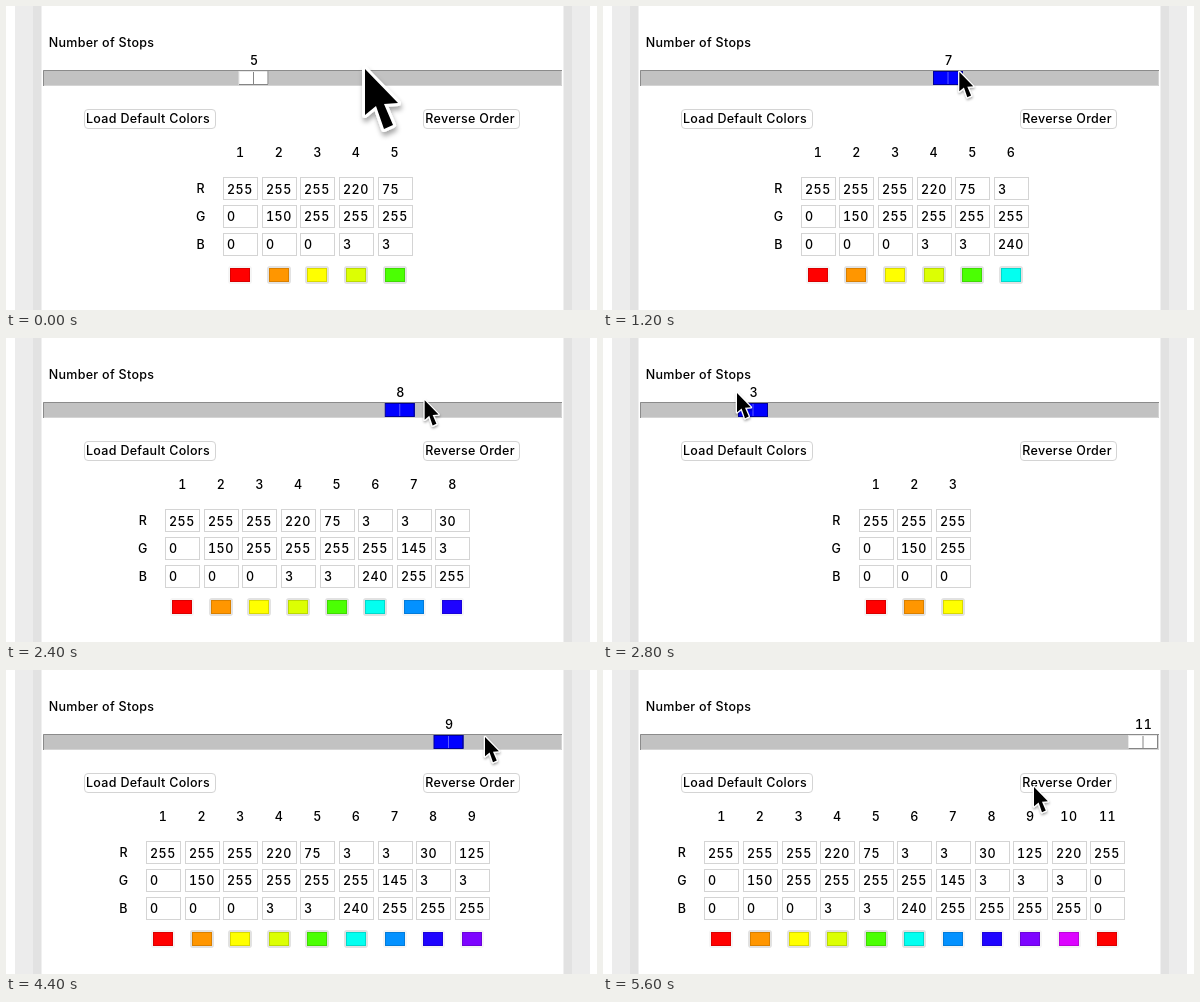
An HTML page that plays this animation: 591 by 304 pixels, repeating every 5800 ms.

```html
<!DOCTYPE html>
<html lang="en">
<head>
<meta charset="utf-8">
<title>Color stops</title>
<style>
  html, body { margin: 0; width: 100%; height: 100%; overflow: hidden; background: #fff; }
  svg { display: block; }
  text { font: 500 12.5px Inter, "Open Sans", sans-serif; letter-spacing: .3px; fill: #000; }
  .num { letter-spacing: .6px; font-variant-numeric: tabular-nums; }
  .mid { text-anchor: middle; }
  .button { fill: #fff; stroke: #d4d4d4; }
  .entry { fill: #fff; stroke: #d4d4d4; }
</style>
</head>
<body>
<svg width="591" height="304" viewBox="0 0 591 304">
  <defs>
    <filter id="shadow" x="-50%" y="-30%" width="200%" height="180%">
      <feDropShadow dx="1" dy="4" stdDeviation="2.5" flood-opacity=".35"/>
    </filter>
    <clipPath id="leftover"><rect x="234" y="165" width="20" height="90"/></clipPath>
  </defs>
  <rect width="591" height="304" fill="#fff"/>
  <path d="M9 0H27V304H9ZM566 0H584V304H566Z" fill="#ececec"/>
  <path d="M27 0H35.5V304H27ZM557.5 0H566V304H557.5Z" fill="#e2e2e2"/>
  <text x="42.7" y="41">Number of Stops</text>
  <rect x="37" y="64" width="519" height="16" fill="#c2c2c2"/>
  <path d="M37.5 80V64.5H556" fill="none" stroke="#8b8b8b"/>
  <path d="M38 79.5H555.5V65" fill="none" stroke="#d4d4d4"/>
  <rect class="button" x="78.5" y="103.5" width="131" height="19" rx="3.5"/>
  <text x="80" y="117">Load Default Colors</text>
  <rect class="button" x="417.5" y="103.5" width="96" height="19" rx="3.5"/>
  <text x="419.3" y="117">Reverse Order</text>
  <g id="slider"></g>
  <g id="table"></g>
  <path id="cursor" d="M0 0V46L11 37L19 60L28 56L19 35L33 34Z" stroke="#fff" stroke-width="6"
        stroke-linejoin="round" paint-order="stroke" filter="url(#shadow)"/>
</svg>
<script>
const STEP = 200, STEPS = 29, PITCH = 38.6;
const COLORS = [
  [255, 0, 0], [255, 150, 0], [255, 255, 0], [220, 255, 3], [75, 255, 3], [3, 255, 240],
  [3, 145, 255], [30, 3, 255], [125, 3, 255], [220, 3, 255], [255, 0, 0]
];
// tracks: step, then values interpolated between the key points
const SLIDER = [[0, 5], [4, 5], [10, 11], [11, 11], [14, 3], [15, 2], [24, 11], [28, 11]];
const CURSOR = [
  [0, 359, 63], [1, 412, 63], [4, 257, 66], [10, 555, 66], [11, 561, 66],
  [14, 134, 55], [15, 92, 57], [18, 259, 60], [22, 479, 67], [25, 553, 67], [28, 431, 117]
];
const LAGGING = [6, 18], UNFILLED = 18;   // steps where the table is still being rebuilt

const el = id => document.getElementById(id);
const text = (x, y, s, cls) => `<text class="${cls}" x="${x}" y="${y}">${s}</text>`;
const rowY = row => 187 + row * 27.8;

function sample(track, step) {
  const i = Math.max(1, track.findIndex(k => k[0] >= step));
  const a = track[i - 1], b = track[i];
  const p = (step - a[0]) / (b[0] - a[0]);
  return a.slice(1).map((v, j) => v + (b[j + 1] - v) * p);
}

function sliderMarkup(value, active) {
  const x = 233 + (value - 5) * 48.75;
  const [face, edge, shade] = active ? ['#00f', '#00009a', '#5a5aff'] : ['#fff', '#e8e8e8', '#858585'];
  return text(x + 15.3, 59, value, 'num mid') +
    `<rect x="${x}" y="65.5" width="29" height="13" fill="${face}" stroke="${edge}"/>
     <path d="M${x} 78.5H${x + 29}V65" fill="none" stroke="${active ? edge : shade}"/>
     <path d="M${x + 14.5} 66V78" stroke="${shade}"/>`;
}

function labels(x) {
  return [...'RGB'].map((c, row) => text(x, rowY(row), c, 'mid')).join('');
}

function tableMarkup(count, filled) {
  const first = 311.3 - (count - 1) * PITCH / 2;
  let out = labels(first - 39.3);
  if (!filled) out += `<g clip-path="url(#leftover)">${labels(233.3)}</g>`;
  for (let i = 0; i < count; i++) {
    const x = first + i * PITCH, rgb = COLORS[i];
    out += text(x + .3, 151, i + 1, 'num mid');
    if (filled) rgb.forEach((v, row) => {
      const left = Math.round(x - 17) + .5;
      out += `<rect class="entry" x="${left}" y="${171.5 + row * 28}" width="34" height="22"/>` +
        text(left + 3.4, rowY(row) + .5, v, 'num');
    });
    const rim = i > 0 && i < 6 ? '#e2e2e2' : '#f5f5f5';
    const left = Math.round(x - 10);
    out += `<rect x="${left - 2}" y="260" width="24" height="18" rx="3" fill="${rim}"/>
      <rect x="${left + .5}" y="262.5" width="19" height="13" fill="rgb(${rgb})"
        stroke="rgb(${rgb.map(v => v * .85)})"/>`;
  }
  return out;
}

let shown = -1;
function render(ms) {
  const step = Math.floor(ms / STEP) % STEPS;
  if (step === shown) return;
  shown = step;
  const value = Math.round(sample(SLIDER, step)[0]);
  const [x, y] = sample(CURSOR, step);
  const size = Math.max(.42, Math.min(1, 1.3 - step * .3));
  el('slider').innerHTML = sliderMarkup(value, step >= 4 && step <= 25);
  el('table').innerHTML = tableMarkup(value - LAGGING.includes(step), step !== UNFILLED);
  el('cursor').setAttribute('transform', `translate(${x} ${y}) scale(${size})`);
}

const start = performance.now();
function tick() {
  render(performance.now() - start);
  requestAnimationFrame(tick);
}
tick();
</script>
</body>
</html>
```
